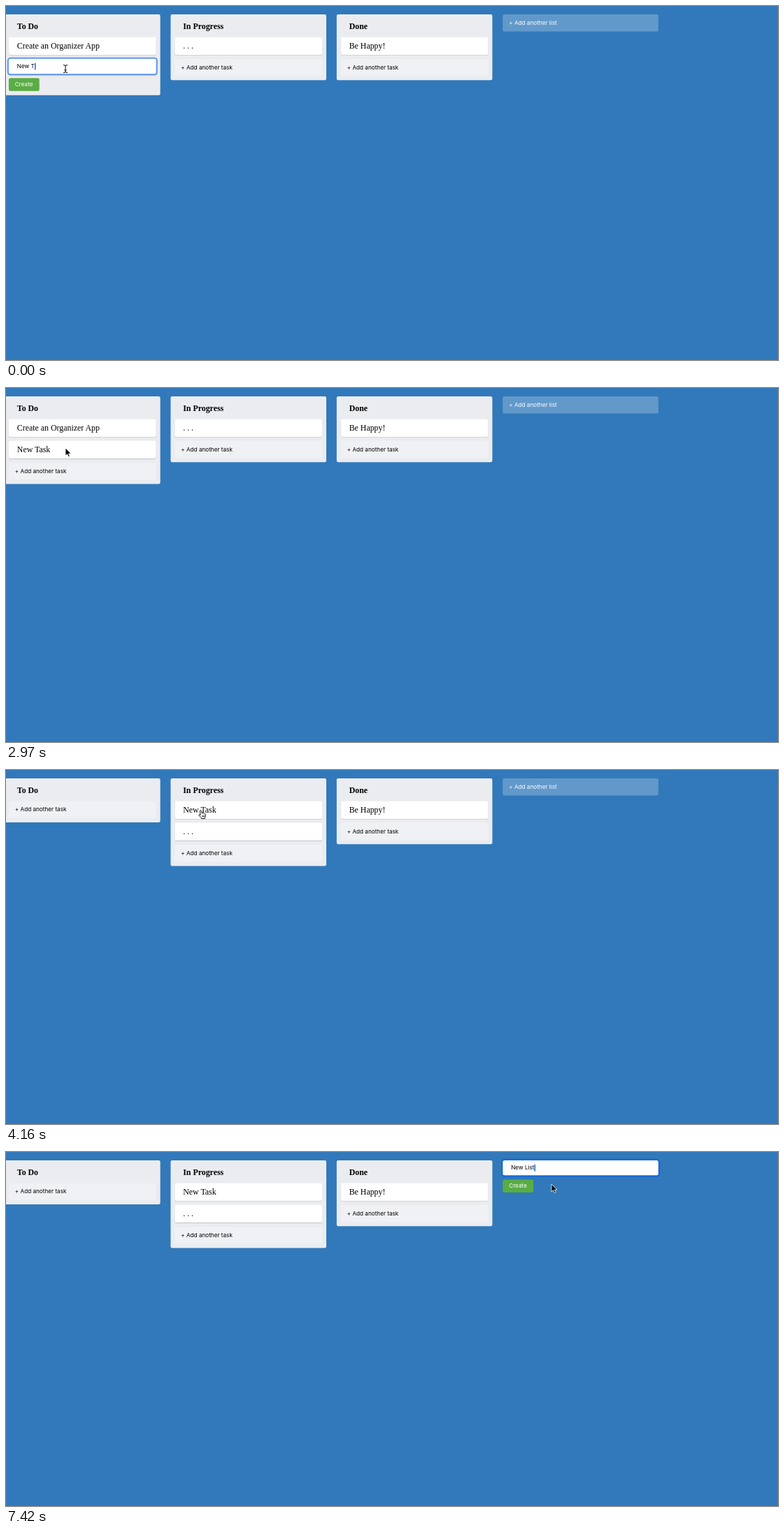
Animation, 1104 px wide and 507 px high, one loop 8000 ms. Source, as an HTML page:

```html
<!DOCTYPE html>
<html lang="en">
<head>
<meta charset="utf-8">
<title>Task board</title>
<style>
html, body { margin: 0; width: 100%; height: 100%; overflow: hidden; background: #3179ba; }
body { position: relative; }
#board {
  position: absolute; left: -2.2px; top: 12px; display: flex; align-items: flex-start;
  transform: scale(.742); transform-origin: 0 0;
}
#board, #drag { font: 16px/18px "Liberation Serif", "Times New Roman", serif; color: #000; }
.col, .slot { box-sizing: border-box; width: 300px; margin-right: 20px; flex: none; }
.col { padding: 8px; border-radius: 3px; background: #ebecf0; }
.title { padding: 6px 16px 12px; font-weight: bold; }
.card, .input { background: #fff; border-radius: 3px; box-shadow: 0 1px #091e4240; margin-bottom: 8px; }
.card { padding: 8px 16px; white-space: pre; }
.hidden { visibility: hidden; }
.add, .input, .create { font: 11px/13px Inter, Roboto, sans-serif; white-space: pre; }
.add { padding: 10px 12px; border-radius: 3px; background: #ffffff3d; }
.slot .add { color: #fff; }
.add.hover { background: #ffffff58; }
.input { padding: 8px 16px; outline: 3px solid rgba(0, 98, 240, .55); }
.input i { display: inline-block; width: 2px; height: 13px; background: #0a6ad6; vertical-align: top; }
.create { display: inline-block; padding: 6px 12px; border-radius: 3px; background: #5aac44; color: #fff; vertical-align: top; }
#drag {
  position: absolute; left: -150px; top: -17px; width: 300px; box-sizing: border-box; margin: 0;
}
#cursor { position: absolute; left: 0; top: 0; width: 1px; height: 1px; overflow: visible; }
</style>
</head>
<body>
<div id="board"></div>
<div id="drag" class="card">New Task</div>
<svg id="cursor">
  <g id="arrow"><path d="M0 0V11L2.6 8.7 4.3 12.5 6.1 11.7 4.5 8H8Z" stroke="#fff" stroke-width=".8"/></g>
  <g id="hand"><path d="M3.2 7.8L2.3 2.2Q2.2 .8 3.2 .7T4.5 1.9L5.1 4.9Q6.2 4.2 6.9 5.2 8 4.6 8.6 5.7 10.2 5.5 10.3 7V9Q10.3 10.6 9.5 11.3V12.5H4.6V11.6L1 8.3Q.4 7 1.5 6.8 2.3 6.8 3.2 7.8ZM5.7 8.2V10.2M7.2 8.2V10.2M8.6 8.2V10.2" fill="#fff" stroke="#000" stroke-width=".9"/></g>
  <g id="beam" fill="none"><path id="bar" d="M-3-5.5Q0-5.5 0-4V4Q0 5.5-3 5.5M3-5.5Q0-5.5 0-4M0 4Q0 5.5 3 5.5M-1.6 1.8H1.6" stroke="#fff" stroke-width="2"/><use href="#bar" style="stroke:#000"/><path d="M-3-5.5Q0-5.5 0-4V4Q0 5.5-3 5.5M3-5.5Q0-5.5 0-4M0 4Q0 5.5 3 5.5M-1.6 1.8H1.6" stroke="#000"/></g>
</svg>
<script>
const $ = id => document.getElementById(id);

// The pointer was sampled in steps: time, shape, x, y
const pointer = [
  [0, 'beam', 85, 90],
  [1190, 'hand', 86, 64], [1340, 'arrow', 97, 22], [1490, 'arrow', 92, 0],
  [1630, 'hand', 70, 64], [1780, 'hand', 78, 78], [1930, 'hand', 81, 83],
  [2530, 'hand', 82, 83], [2830, 'arrow', 84, 86], [2970, 'arrow', 85, 86],
  [3120, 'arrow', 100, 80], [3270, 'arrow', 140, 77], [3410, 'arrow', 200, 71],
  [3560, 'arrow', 261, 64], [3710, 'arrow', 278, 61], [3860, 'arrow', 279, 59],
  [4010, 'hand', 275, 57], [4310, 'hand', 300, 60], [4450, 'hand', 470, 52],
  [4600, 'hand', 680, 42], [4750, 'arrow', 802, 37], [4900, 'hand', 793, 30],
  [5040, 'hand', 785, 26], [5340, 'arrow', 788, 30], [5490, 'arrow', 783, 40],
  [5630, 'arrow', 780, 46]
];
const taskKeys = [[0, 'New T'], [150, 'New Tas'], [290, 'New Task']];
const listKeys = [
  [0, ''], [5930, 'N'], [6080, 'Ne'], [6230, 'New'], [6380, 'New '],
  [6680, 'New L'], [7130, 'New Li'], [7280, 'New Lis'], [7420, 'New List']
];

const latest = (steps, t) => steps.filter(s => s[0] <= t).pop();
const card = (text, cls = '') => `<div class="card ${cls}">${text}</div>`;
const add = (what, cls = '') => `<div class="add ${cls}">+ Add another ${what}</div>`;
const form = text => `<div class="input">${text}<i></i></div><div class="create">Create</div>`;
const column = (title, cards, foot = add('task')) =>
  `<div class="col"><div class="title">${title}</div>${cards}${foot}</div>`;

function boardAt(t, dragging) {
  const dropped = t >= 3860;
  const task = card('New Task', dragging ? 'hidden' : '');
  const todo = dropped ? '' : card('Create an Organizer App') + (t < 740 ? '' : task);
  const foot = t < 740 ? form(latest(taskKeys, t)[1]) : add('task');
  const slot = t < 5340 ? add('list', t >= 4900 ? 'hover' : '') : form(latest(listKeys, t)[1]);
  return column('To Do', todo, foot) +
    column('In Progress', (dropped ? task : '') + card('. . .')) +
    column('Done', card('Be Happy!')) +
    `<div class="slot">${slot}</div>`;
}

let shown;
function frame() {
  const t = performance.now() % 8000;
  const dragging = t >= 3120 && t < 3860;
  const html = boardAt(t, dragging);
  if (html !== shown) $('board').innerHTML = shown = html;

  const [, shape, x, y] = latest(pointer, t);
  $('drag').style.display = dragging ? 'block' : 'none';
  $('drag').style.transform = `translate(${x + 20.7}px, ${y + 9}px) rotate(5deg) scale(.742)`;
  for (const id of ['arrow', 'hand', 'beam']) $(id).style.display = id === shape ? '' : 'none';
  $(shape).setAttribute('transform', `translate(${x} ${y})`);
  requestAnimationFrame(frame);
}
frame();
</script>
</body>
</html>
```
